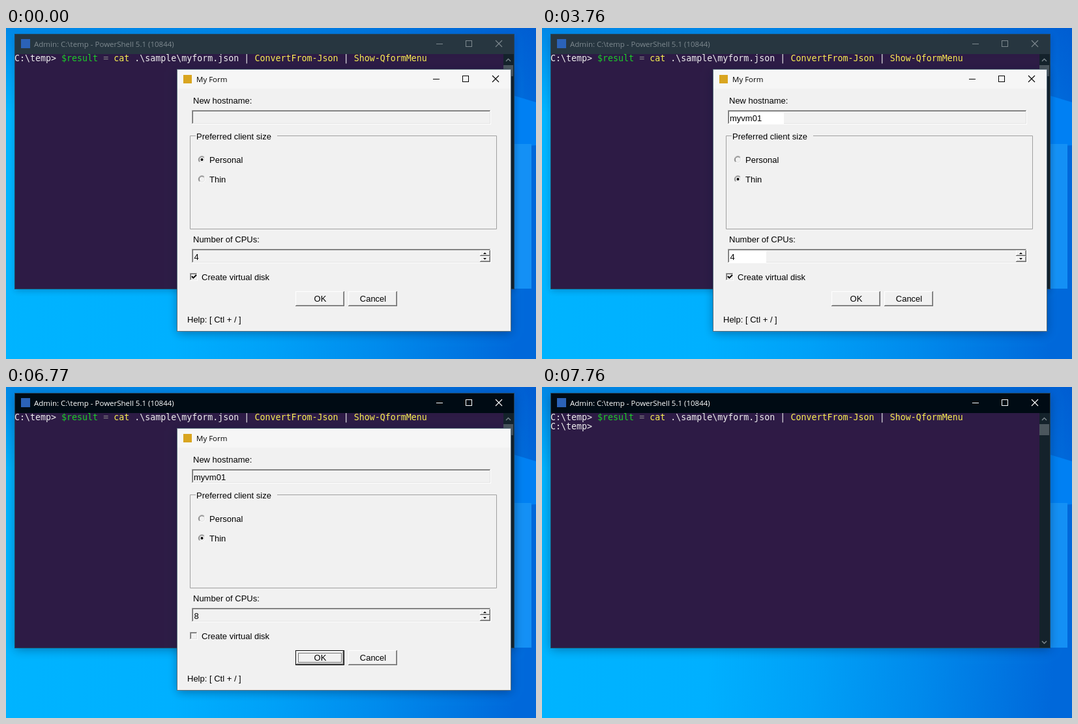
Write an HTML page with a canvas that moves like this. It is 813 px wide and 508 px high and loops after 8 s.

```html
<!DOCTYPE html>
<html lang="en">
<head>
<meta charset="utf-8">
<title>My Form</title>
<style>
html, body { margin: 0; width: 100%; height: 100%; overflow: hidden; background: #00a4fb; }
canvas { display: block; }
</style>
</head>
<body>
<canvas id="stage" width="813" height="508"></canvas>
<script>
const W = 813, H = 508, LOOP = 8000;
const UI = '11.5px "Open Sans", sans-serif';
const FORM = '13px "Liberation Sans", Arial, sans-serif';
const MONO = '13.3px "DejaVu Sans Mono", monospace';
const BODY = '#f1f1f1';

const screen = document.getElementById('stage').getContext('2d');
const layer = document.createElement('canvas');
layer.width = W;
layer.height = H;
const formCtx = layer.getContext('2d');
let g = screen;

// [start, text, end of repainted area, caret x]
const HOST = [[0, '', 0, 0], [500, 'm', 300, 0], [620, 'm', 300, 299], [870, 'my', 307, 306],
  [1370, 'myvm', 325, 324], [1740, 'myvm0', 332, 331], [1860, 'myvm01', 339, 338],
  [2110, 'myvm01', 371, 0], [6650, 'myvm01', 0, 0]];
const CPUS = [[0, '4', 0, 0], [3260, '4', 344, 289], [3760, '4', 344, 0], [4130, '4', 344, 296],
  [4380, '', 344, 289], [4880, '8', 344, 296], [5130, '8', 410, 0], [6650, '8', 0, 0]];
const at = (steps, t) => steps.filter(s => s[0] <= t).pop();

function rect(color, x, y, w, h) {
  g.fillStyle = color;
  g.fillRect(x, y, w, h);
}
function box(color, x, y, w, h) {
  g.strokeStyle = color;
  g.lineWidth = 1;
  g.strokeRect(x + .5, y + .5, w - 1, h - 1);
}
function path(color, width, ...p) {
  g.strokeStyle = color;
  g.lineWidth = width;
  g.beginPath();
  for (let i = 0; i < p.length; i += 2) g.lineTo(p[i], p[i + 1]);
  g.stroke();
}
function poly(color, ...p) {
  g.fillStyle = color;
  g.beginPath();
  for (let i = 0; i < p.length; i += 2) g.lineTo(p[i], p[i + 1]);
  g.fill();
}
function text(s, x, y, font = FORM, color = '#000', align = 'left') {
  g.font = font;
  g.fillStyle = color;
  g.textAlign = align;
  g.fillText(s, x, y);
}
function gradient(x0, y0, x1, y1, ...stops) {
  const grad = g.createLinearGradient(x0, y0, x1, y1);
  for (let i = 0; i < stops.length; i += 2) grad.addColorStop(stops[i], stops[i + 1]);
  return grad;
}
function shadowed(alpha, blur, paint) {
  g.save();
  g.shadowColor = `rgba(0,20,50,${alpha})`;
  g.shadowBlur = blur;
  g.shadowOffsetY = 3;
  paint();
  g.restore();
}
function captionButtons(x, y, color) {
  rect(color, x - 5, y, 10, 1);
  box(color, x + 40, y - 5, 10, 10);
  path(color, 1.1, x + 86, y - 5, x + 96, y + 5);
  path(color, 1.1, x + 96, y - 5, x + 86, y + 5);
}

function wallpaper() {
  rect(gradient(0, 0, W, 60, 0, '#00b4ff', .35, '#00b0ff', .55, '#00a0f7', .75, '#008aec', 1, '#0068da'), 0, 0, W, H);
  rect(gradient(0, 0, 0, 130, 0, 'rgba(0,80,200,.45)', 1, 'rgba(0,80,200,0)'), 0, 0, W, 130);
  poly('#0080f3', 740, 92, W, 114, W, 180, 740, 185);
  rect('#1490f5', 584, 178, 222, 222);
}

function terminal(active, t) {
  shadowed(active ? .38 : .25, active ? 15 : 10, () => rect('#2d1b45', 14, 10, 765, 390));
  box('#24455c', 13, 9, 767, 392);
  rect('#2f1a45', 258, 66, 505, 334);
  rect(active ? '#000b14' : '#273640', 14, 10, 765, 30);
  rect('#2b62b8', 23, 17, 14, 14);
  text('Admin: C:\\temp - PowerShell 5.1 (10844)', 43, 29, UI, active ? '#fff' : '#7e898f');
  captionButtons(665, 24, active ? '#fff' : '#7e898f');

  rect('#14222b', 763, 40, 16, 360);
  rect('#4b565d', 763, 57, 15, 17);
  path('#7c888e', 1.4, 767, 51, 770.5, 47.5, 774, 51);
  path('#7c888e', 1.4, 767, 390, 770.5, 393.5, 774, 390);

  const words = [['C:\\temp> ', '#eee'], ['$result', '#1bcf28'], [' = ', '#858585'], ['cat', '#f8ee50'],
    [' .\\sample\\myform.json | ', '#eee'], ['ConvertFrom-Json', '#f8ee50'], [' | ', '#eee'],
    ['Show-QformMenu', '#f8ee50']];
  let x = 13;
  for (const [word, color] of words) {
    text(word, x, 51, MONO, color);
    x += word.length * 8.01;
  }
  if (t >= 6890) {
    text('C:\\temp>', 13, 65, MONO, '#eee');
    if (t < 7760) rect('#c4ecdc', 86, 64, 8, 4);
  }
}

function sunken(x, y, w, h) {
  rect('#fff', x, y, w, h);
  rect('#a0a0a0', x, y, w - 1, h - 1);
  rect('#e3e3e3', x + 1, y + 1, w - 2, h - 2);
  rect('#696969', x + 1, y + 1, w - 3, h - 3);
  rect(BODY, x + 2, y + 2, w - 4, h - 4);
}
function raised(x, y, w, h) {
  rect('#696969', x, y, w, h);
  rect('#fff', x, y, w - 1, h - 1);
  rect('#a0a0a0', x + 1, y + 1, w - 2, h - 2);
  rect(BODY, x + 1, y + 1, w - 3, h - 3);
}
function focus(x, y, w, h) {
  g.setLineDash([1, 1]);
  box('#000', x, y, w, h);
  g.setLineDash([]);
}
function field(y, [, value, end, caret], x, top, bottom) {
  sunken(285, y, 459, 22);
  if (end) rect('#fff', 287, top, end - 287, bottom - top);
  text(value, x, y + 16.5);
  if (caret) rect('#000', caret, y + 3, 1, 16);
}
function radio(y, label, on) {
  const arc = (color, r, from) => {
    g.strokeStyle = color;
    g.lineWidth = 1;
    g.beginPath();
    g.arc(300.5, y, r, from, from + Math.PI);
    g.stroke();
  };
  arc('#fff', 5.3, -Math.PI / 4);
  arc('#a0a0a0', 5.3, Math.PI * .75);
  arc('#e3e3e3', 4.3, -Math.PI / 4);
  arc('#696969', 4.3, Math.PI * .75);
  if (on) {
    g.fillStyle = '#000';
    g.beginPath();
    g.arc(300.5, y, 2, 0, 7);
    g.fill();
  }
  text(label, 312, y + 5);
}

function form(t) {
  rect(BODY, 263, 64, 511, 401);
  rect('#f6f6f6', 263, 64, 511, 29);
  box('#5b6f7c', 262, 63, 513, 403);
  rect('#d9a520', 272, 72, 13, 13);
  text('My Form', 292, 83, UI);
  if (t < 6770) captionButtons(660, 78, '#000');

  text('New hostname:', 287, 116);
  field(126, at(HOST, t), 288, 129, 148);

  path('#a0a0a0', 1, 291, 165.5, 282.5, 165.5, 282.5, 308.5, 752.5, 308.5, 752.5, 165.5, 416, 165.5);
  text('Preferred client size', 292, 171);
  const thin = t >= 2760;
  radio(202, 'Personal', !thin);
  radio(232, 'Thin', thin);
  if (t >= 2110 && !thin) focus(310, 194, 61, 19);
  if (thin && t < 3260) focus(310, 224, 34, 19);

  text('Number of CPUs:', 287, 329);
  field(339, at(CPUS, t), 288.5, 342, 360);
  raised(727, 341, 16, 9);
  raised(727, 350, 16, 9);
  poly('#000', 732, 347, 737, 347, 734.5, 344.5);
  poly('#000', 732, 353, 737, 353, 734.5, 355.5);

  sunken(282, 376, 12, 12);
  if (t < 6160) path('#000', 2, 285, 381, 287.3, 383.6, 292, 379);
  text('Create virtual disk', 300, 387);
  if (t >= 5130 && t < 6280) focus(299, 374, 111, 17);

  raised(444, 404, 75, 23);
  raised(525, 404, 75, 23);
  if (t >= 6280) {
    raised(445, 405, 73, 21);
    box('#000', 444, 404, 75, 23);
    focus(448, 408, 67, 15);
  }
  text('OK', 482, 420, FORM, '#000', 'center');
  text('Cancel', 563, 420, FORM, '#000', 'center');
  text('Help: [ Ctl + / ]', 278, 452);
}

function draw(t) {
  g = screen;
  wallpaper();
  terminal(t >= 6650, t);
  if (t >= 7010) return;
  if (t < 6890) {
    shadowed(.4, 14, () => rect(BODY, 263, 64, 511, 401));
    form(t);
    return;
  }
  // closing: the form shrinks and fades as one layer
  g = formCtx;
  g.clearRect(0, 0, W, H);
  form(t);
  screen.save();
  screen.globalAlpha = .14;
  screen.translate(517.3, 264);
  screen.scale(.96, .962);
  screen.drawImage(layer, -518.5, -264.5);
  screen.restore();
}

function tick() {
  draw(performance.now() % LOOP);
  requestAnimationFrame(tick);
}
tick();
</script>
</body>
</html>
```
